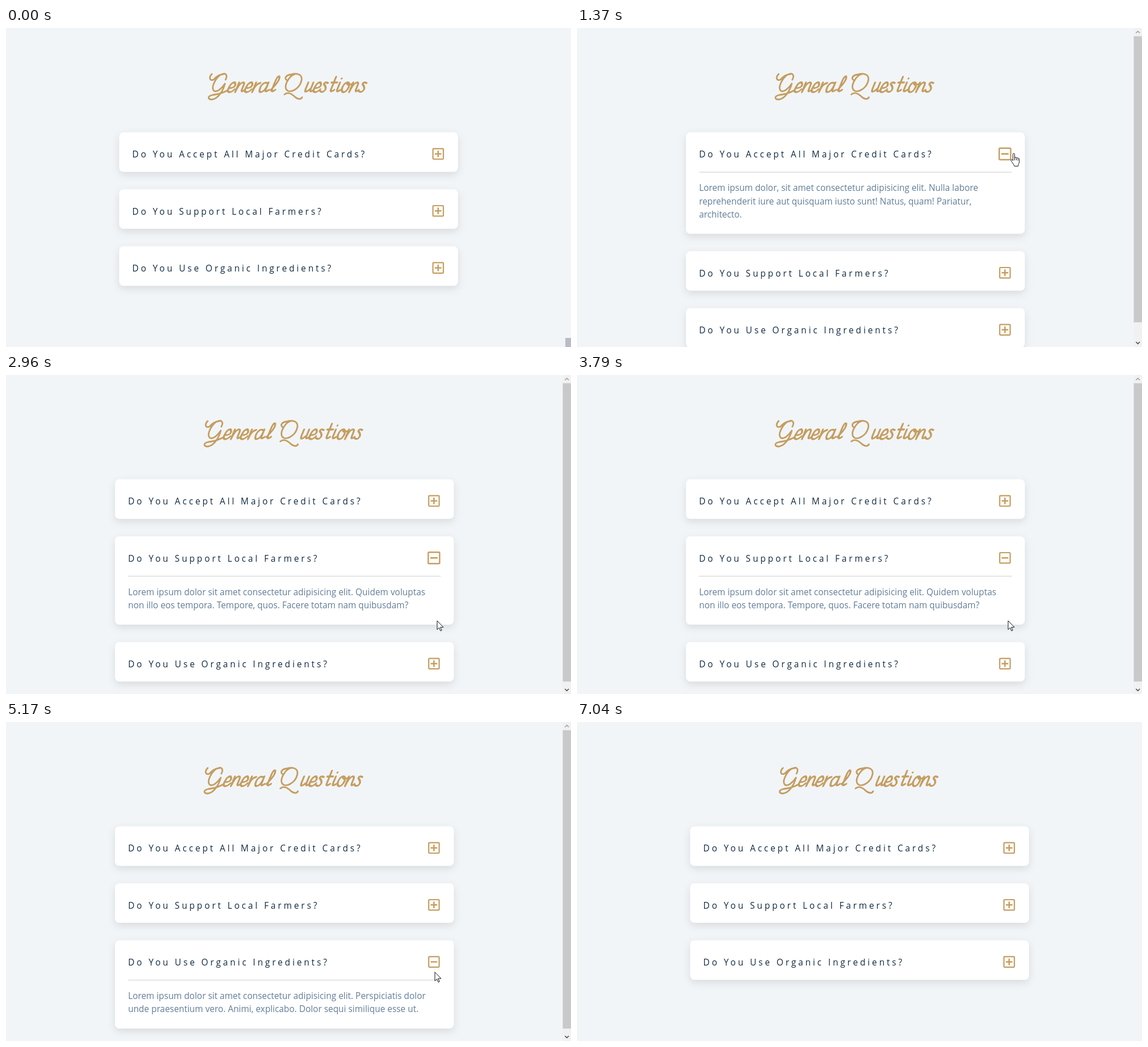
Recreate the animation shown at these times as an HTML page. Size 996 by 562 pixels, loop 7510 ms.

```html
<!DOCTYPE html>
<html lang="en">
<head>
<meta charset="utf-8">
<title>General Questions</title>
<style>
  html, body { margin: 0; width: 100%; height: 100%; overflow: hidden; background: #f1f5f8; }
  svg { display: block; width: 996px; height: 562px; }
  text { font: 15.41px "Open Sans", sans-serif; white-space: pre; }
  .question { fill: #102a42; letter-spacing: 3.89px; }
  .answer { fill: #617d98; }
  .box { fill: #fff; filter: drop-shadow(0 5px 7px rgba(0, 0, 0, .1)); }
  .title { fill: none; stroke: #c59d5f; stroke-width: 3.3; stroke-linecap: round; stroke-linejoin: round; }
  .caps { stroke-width: 2.8; }
  .cursor { fill: #fff; stroke: #111; stroke-linejoin: round; }
</style>
</head>
<body>
<svg viewBox="0 0 996 562">
  <g id="page">
    <g id="title" class="title" role="img" aria-label="General Questions">
      <path class="caps" d="M387 91C391 84 388 79 382 81C371 84 361 104 366 110C371 115 381 106 386 98C383 110 374 125 363 126C355 126 355 120 364 118Q380 116 390 110M363 81C357 87 359 94 366 91Q374 82 384 81"/>
      <path class="caps" d="M495 92C490 88 494 83 502 82C512 79 523 81 521 92C518 107 500 117 494 108C490 100 500 83 510 81M491 117C498 111 505 117 510 122Q519 128 522 122"/>
    </g>
    <g id="cards"></g>
  </g>
  <g id="scrollbar">
    <rect x="981.5" width="14.5" height="562" fill="#f1f1f1"/>
    <rect id="thumb" x="981.5" y="14.5" width="14.5" fill="#c9c9c9"/>
    <g fill="none" stroke-width="1.6">
      <path d="M985.3 9l3.4-3.4 3.4 3.4" stroke="#a3a3a3"/>
      <path d="M985.3 553l3.4 3.4 3.4-3.4" stroke="#505050"/>
    </g>
  </g>
  <rect id="corner" x="986" y="546" width="10" height="16" fill="#bcbac6"/>
  <g id="cursor" class="cursor">
    <path id="arrow" d="M0 0V15.5L3.6 12.2 6 17.8 8.2 16.8 5.8 11.3H11Z"/>
    <path id="hand" d="M-1.5.5a1.5 1.5 0 0 1 3 0V7c.3-1.7 3-1.7 3 .2 .4-1.3 2.8-1 2.8.7 .5-1 2.3-.6 2.3 1v5c0 3-2 4-2 7.5H1c-.3-2.5-4-6-5.8-9.7-.9-2 1.2-2.7 2.2-1.5l1.1 1.5ZM1.5 7v4M4.5 7.5v3.5M7.3 8.5v3"/>
  </g>
</svg>
<script>
const LOOP = 7510;
const LEFT = 199.5, TOP = 183.8, WIDTH = 597.3, CLOSED = 69.6, GAP = 30.8, LINE = 23.1, PAD = 23.1;
const $ = id => document.getElementById(id);

function add(parent, tag, attrs, text) {
  const node = document.createElementNS("http://www.w3.org/2000/svg", tag);
  for (const key in attrs) node.setAttribute(key, attrs[key]);
  if (text) node.textContent = text;
  return parent.appendChild(node);
}

// Upright letters as [advance, path], slanted when written; the stem is shared
const stem = "v13q1 5 6 0";
const glyphs = {
  e: [12, "M1-7q10 0 9-6q-3-8-8-1q-4 14 3 14q4 0 7-5"],
  n: [18, "M3-17V0q1-15 6-17q4-1 4 5v8q1 5 5 0"],
  r: [13, "M3-17V0q0-15 8-16"],
  a: [19, "M12-15q-9-5-11 6q0 13 8 7q3-4 3-13M12-17" + stem],
  l: [14, "M2-4Q12-20 8-27Q4-31 4-17" + stem],
  u: [17, "M3-17v12q1 9 9-2M12-17" + stem],
  s: [13, "M9-16q-7-3-6 2q7 6 6 10q-2 6-8 2"],
  t: [13, "M6-27v10" + stem + "M2-17h10"],
  i: [9, "M4-17" + stem + "M4-24h.1"],
  o: [15, "M8-17a5.5 8.5 0 1 0 .1 0q1 6 8 3"]
};
function write(word, x) {
  for (const letter of word) {
    const [advance, d] = glyphs[letter];
    add($("title"), "path", { d, transform: `translate(${x} 113) skewX(-22)` });
    x += advance;
  }
}
write("eneral", 389);
write("uestions", 523);

const lorem = "Lorem ipsum dolor sit amet consectetur adipisicing elit. ";
const cards = [
  { question: "Do You Accept All Major Credit Cards?",
    answer: ["Lorem ipsum dolor, sit amet consectetur adipisicing elit. Nulla labore",
      "reprehenderit iure aut quisquam iusto sunt! Natus, quam! Pariatur,", "architecto."],
    hovers: [[740, 1480]] },
  { question: "Do You Support Local Farmers?",
    answer: [lorem + "Quidem voluptas", "non illo eos tempora. Tempore, quos. Facere totam nam quibusdam?"],
    hovers: [[2390, 2930], [5330, 5480]] },
  { question: "Do You Use Organic Ingredients?",
    answer: [lorem + "Perspiciatis dolor", "unde praesentium vero. Animi, explicabo. Dolor sequi similique esse ut."],
    hovers: [[4335, 4640], [5720, 6470]] }
];

for (const card of cards) {
  card.node = add($("cards"), "g", {});
  card.box = add(card.node, "rect", { class: "box", width: WIDTH, rx: 7.7 });
  add(card.node, "text", { class: "question", x: PAD, y: 44.7 }, card.question);
  card.detail = add(card.node, "g", {});
  add(card.detail, "rect", { x: PAD, y: 69.7, width: WIDTH - 2 * PAD, height: 1, fill: "#ccc" });
  card.answer.forEach((line, i) =>
    add(card.detail, "text", { class: "answer", x: PAD, y: 103.7 + i * LINE }, line));
  card.icon = add(card.node, "g", { fill: "none", stroke: "#c59d5f" });
  add(card.icon, "rect", { x: -9.2, y: -9.2, width: 18.4, height: 18.4, rx: 1.2, "stroke-width": 2.2 });
  add(card.icon, "path", { d: "M-5.9 0H5.9", "stroke-width": 2.5 });
  card.bar = add(card.icon, "path", { d: "M0-5.9V5.9", "stroke-width": 2.5 });
}

// Pointer moves: start, end, x, y
const moves = [[70, 620, 745, 252], [620, 830, 770, 222], [1910, 2190, 775, 372], [2190, 2450, 760, 433],
  [3790, 4420, 755, 510], [5030, 5390, 758, 306], [5390, 5730, 761, 423], [6410, 7040, 1000, 575]];

const clamp = p => Math.min(1, Math.max(0, p));
const smooth = p => p * p * (3 - 2 * p);

function pointer(t) {
  let x = 1000, y = 566;
  for (const [start, end, toX, toY] of moves) {
    const p = smooth(clamp((t - start) / (end - start)));
    x += (toX - x) * p;
    y += (toY - y) * p;
  }
  return [x, y];
}

// Hovered icons grow by a tenth and shrink back afterwards
const grow = (hovers, t) => Math.max(...hovers.map(([from, to]) =>
  smooth(clamp((t - from) / 150)) * smooth(clamp((to + 150 - t) / 150))));

const show = (node, on) => node.setAttribute("visibility", on ? "visible" : "hidden");
const openCard = t => t < 1310 || t >= 6150 ? -1 : t < 2680 ? 0 : t < 4490 ? 1 : 2;

function draw(t) {
  const open = openCard(t);
  $("page").setAttribute("transform", `translate(${open < 0 ? 0 : -7.4} 0)`);
  $("scrollbar").setAttribute("display", open < 0 ? "none" : "inline");
  $("thumb").setAttribute("height", open === 0 ? 504 : 525.5);

  let y = TOP;
  cards.forEach((card, i) => {
    const isOpen = i === open;
    const height = CLOSED + (isOpen ? 39.7 + card.answer.length * LINE : 0);
    card.node.setAttribute("transform", `translate(${LEFT} ${y})`);
    card.box.setAttribute("height", height);
    show(card.detail, isOpen);
    show(card.bar, !isOpen);
    card.icon.setAttribute("transform", `translate(562.3 38) scale(${1 + .1 * grow(card.hovers, t)})`);
    y += height + GAP;
  });

  const hand = cards.some(card => card.hovers.some(([from, to]) => t >= from + 90 && t < to));
  $("cursor").setAttribute("transform", `translate(${pointer(t)})`);
  show($("hand"), hand);
  show($("arrow"), !hand);
  show($("corner"), t < 70);
}

function tick(now) {
  draw(now % LOOP);
  requestAnimationFrame(tick);
}
draw(0);
requestAnimationFrame(tick);
</script>
</body>
</html>
```
